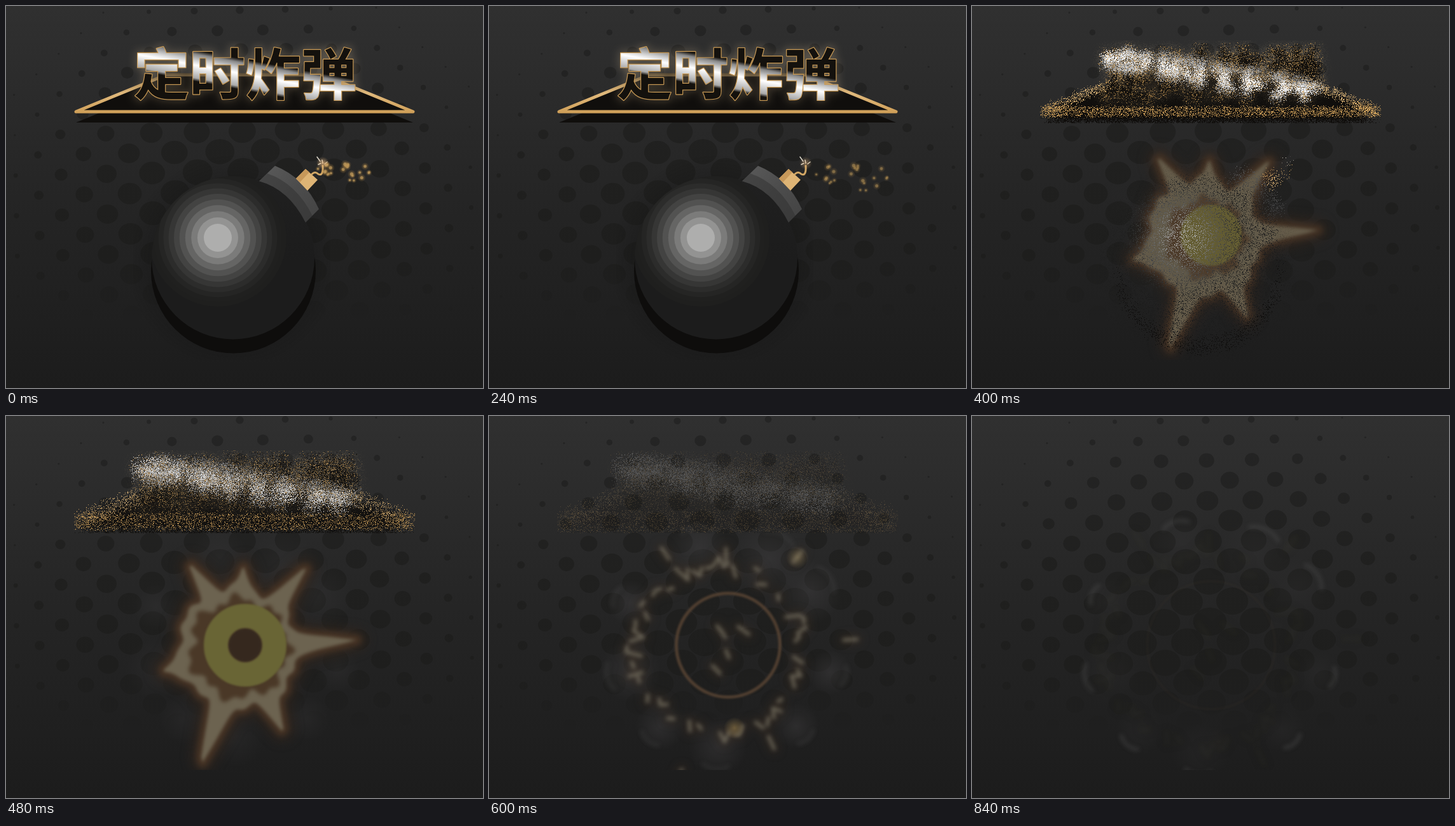
Recreate the animation shown at these times as an HTML page with a canvas. Size 750 by 600 pixels, loop 960 ms.

```html
<!DOCTYPE html>
<html lang="zh-CN">
<meta charset="utf-8">
<title>定时炸弹</title>
<style>
html, body { margin: 0; height: 100%; overflow: hidden; background: #222 }
canvas { display: block }
</style>
<canvas id="stage" width="750" height="600"></canvas>
<script>
const TAU = Math.PI * 2, LOOP = 960, STEP = 40, LAST_STEP = 21;
const { cos, sin, abs, hypot, min, max, round } = Math;
const stage = document.getElementById('stage').getContext('2d');

// Piecewise linear keys: time, value, time, value...
function key(t, ...k) {
  if (t <= k[0]) return k[1];
  for (let i = 2; i < k.length; i += 2)
    if (t <= k[i]) return k[i - 1] + (k[i + 1] - k[i - 1]) * (t - k[i - 2]) / (k[i] - k[i - 2]);
  return k[k.length - 1];
}

function random(seed) {
  return () => {
    seed = seed + 0x6D2B79F5 | 0;
    let n = Math.imul(seed ^ seed >>> 15, 1 | seed);
    n = n + Math.imul(n ^ n >>> 7, 61 | n) ^ n;
    return ((n ^ n >>> 14) >>> 0) / 4294967296;
  };
}

function gradient(c, x0, y0, x1, y1, ...stops) {
  const g = c.createLinearGradient(x0, y0, x1, y1);
  for (let i = 0; i < stops.length; i += 2) g.addColorStop(stops[i], stops[i + 1]);
  return g;
}

function glow(c, x, y, r, color, alpha) {
  const g = c.createRadialGradient(x, y, 0, x, y, r);
  g.addColorStop(0, `rgba(${color},${alpha})`);
  g.addColorStop(.4, `rgba(${color},${alpha * .6})`);
  g.addColorStop(1, `rgba(${color},0)`);
  c.fillStyle = g;
  c.fillRect(x - r, y - r, r * 2, r * 2);
}

function disc(c, x, y, r, fill) {
  c.fillStyle = fill;
  c.beginPath();
  c.arc(x, y, r, 0, TAU);
  c.fill();
}

function layer(x, y, w, h, draw) {
  const canvas = document.createElement('canvas');
  canvas.width = w;
  canvas.height = h;
  const c = canvas.getContext('2d', { willReadFrequently: true });
  c.translate(-x, -y);
  draw(c);
  const pixels = new Uint32Array(c.getImageData(0, 0, w, h).data.buffer);
  return { x, y, w, h, canvas, c, pixels, out: c.createImageData(w, h) };
}

// Shifts every pixel by up to `amount`; only the share `keep` stays visible.
function stamp({ x, y, w, h, canvas, c, pixels, out }, amount, keep, alpha) {
  if (keep <= 0 || alpha <= 0) return;
  const rnd = random(7), target = new Uint32Array(out.data.buffer);
  const shift = (v, end) => min(end, max(0, round(v + (rnd() * 2 - 1) * amount)));
  for (let j = 0, i = 0; j < h; j++)
    for (let k = 0; k < w; k++, i++) {
      const p = shift(j, h - 1) * w + shift(k, w - 1);
      target[i] = rnd() < keep ? pixels[p] : 0;
    }
  c.putImageData(out, 0, 0);
  stage.globalAlpha = alpha;
  stage.drawImage(canvas, x, y);
  stage.globalAlpha = 1;
}

const backdrop = layer(0, 0, 750, 600, c => {
  c.fillStyle = gradient(c, 0, 0, 0, 600, 0, '#303030', .5, '#252525', .72, '#212121', 1, '#1c1c1c');
  c.fillRect(0, 0, 750, 600);
  c.fillStyle = gradient(c, 0, 0, 0, 490, 0, '#252525', .5, '#20201f', .8, '#1e1e1d', 1, '#1f1f1f');
  for (let row = -11; row < 6; row++)
    for (let col = -12; col < 13; col++) {
      const x = 374 + col * 71.5 + row * 36.4, y = 323 - col * 1.3 + row * 31;
      const d = hypot((x - 370) * .98, y - 334);
      if (d > 408 || y > 490) continue;
      const r = max(1.6, 26.5 * (1 - (d / 387) ** 1.6));
      c.beginPath();
      c.ellipse(x, y, r, r * (1 - r * .006), 0, 0, TAU);
      c.fill();
    }
});

const title = layer(107, 54, 536, 130, c => {
  const plate = new Path2D('M110 166L252 108H498L640 166Z');
  c.fillStyle = '#100e0c';
  c.translate(0, 17);
  c.fill(plate);
  c.translate(0, -17);
  c.fill(plate);
  c.lineWidth = 5;
  c.lineJoin = 'round';
  c.strokeStyle = gradient(c, 0, 106, 0, 168, 0, '#4a3d29', .25, '#b8935c', .5, '#e0b97c', 1, '#cf9f58');
  c.stroke(plate);

  const text = '定时炸弹', x = 376, y = 139.5;
  c.font = '900 87.5px "Noto Sans CJK SC", "Noto Sans CJK", sans-serif';
  c.textAlign = 'center';
  c.lineWidth = 2.4;
  c.strokeStyle = '#c99a55';
  c.shadowColor = 'rgba(222,196,155,.75)';
  c.shadowBlur = 14;
  c.strokeText(text, x, y);
  c.shadowBlur = 0;
  c.fillStyle = gradient(c, 384, 58, 366, 156, 0, '#14110d', .27, '#14110d', .33, '#888',
    .42, '#ccc', .5, '#fff', .62, '#ccc', .7, '#aaa', .75, '#14110d');
  c.fillText(text, x, y);
});

const bomb = layer(200, 230, 310, 326, c => {
  glow(c, 357, 400, 165, '16,16,16', .9);
  disc(c, 357.5, 416, 129.5, '#0e0d0c');
  c.save();
  c.beginPath();
  c.arc(357, 395.5, 128, 0, TAU);
  c.clip();
  c.fillStyle = gradient(c, 0, 268, 0, 400, 0, '#202020', 1, '#1c1c1c');
  c.fillRect(200, 230, 310, 326);
  for (let i = 0; i <= 10; i++) {
    const grey = 31 + 1.43 * i * i;
    disc(c, 333, 364, 108 - 7 * i - .16 * i * i, `rgb(${grey},${grey},${grey - 1})`);
  }
  c.restore();

  c.fillStyle = gradient(c, 412, 262, 482, 330, 0, '#575757', .5, '#4c4c4c', 1, '#454545');
  c.fill(new Path2D('M423 251Q470 270 492 319L471 340Q445 288 398 275Z'));
  c.fillStyle = 'rgba(45,45,45,.45)';
  c.fill(new Path2D('M411 263Q457 279 482 330L471 340Q445 288 398 275Z'));
  c.fillStyle = '#deb475';
  c.fill(new Path2D('M471 256L490 273L474 290L456 271Z'));
  c.fillStyle = '#c7985a';
  c.fill(new Path2D('M471 256L477 261L462 277L456 271Z'));
  c.lineCap = 'round';
  c.lineWidth = 3;
  c.strokeStyle = '#d2a765';
  c.stroke(new Path2D('M481 264Q486 259 491 264Q499 268 498 251'));
  c.lineWidth = 1.5;
  c.strokeStyle = '#ddd8cc';
  c.stroke(new Path2D('M489 237L494 244M497 242L498 247M505 245L501 248M491 249L495 247'));
});

// Sparks drift away from the fuse and fan out as they go.
function drawSparks(t) {
  const alpha = key(t, 200, 1, 310, 0), rnd = random(5);
  if (!alpha) return;
  for (let i = 0; i < 24; i++) {
    const u = rnd() ** 1.3, way = u * 82 + t * (.1 + .13 * u);
    const x = 490 + way, y = 252 + way * .25 + (rnd() - .5) * (12 + way * .4);
    const size = .5 + rnd() * .5;
    glow(stage, x, y, 7 * size, '190,145,75', .6 * alpha);
    disc(stage, x, y, 2.8 * size, `rgba(190,155,95,${.65 * alpha})`);
  }
  glow(stage, 498, 247, 10, '240,190,130', .7 * alpha);
}

// Angle and length of the long rays of the blast.
const rays = [[-.05, 179], [-.9, 163], [-1.58, 127], [-2.16, 159], [2.84, 135], [1.92, 202], [1.14, 152]];

const polar = (a, r) => [374 + cos(a) * r, 361 + sin(a) * r];

function blastPath(scale, reach, jag) {
  const path = new Path2D();
  for (let i = 0; i < 240; i++) {
    const a = i / 240 * TAU;
    const base = 94 - 9 * cos(a) + 5 * sin(a) + jag * (sin(7 * a + 1) + .7 * sin(17 * a));
    let r = base;
    for (const [angle, length] of rays) {
      const off = abs(Math.atan2(sin(a - angle), cos(a - angle))) / .3;
      if (off < 1) r = max(r, base + reach * (length - base) * (1 - off) ** 3);
    }
    path.lineTo(...polar(a, r * scale));
  }
  path.closePath();
  return path;
}

function blurred(blur, alpha, paint) {
  stage.save();
  stage.globalAlpha = alpha;
  stage.filter = `blur(${blur}px)`;
  paint();
  stage.restore();
}

function fillBlurred(path, color, blur, alpha) {
  blurred(blur, alpha, () => {
    stage.fillStyle = color;
    stage.fill(path);
  });
}

function strokeBlurred(path, color, width, blur, alpha) {
  blurred(blur, alpha, () => {
    stage.strokeStyle = color;
    stage.lineWidth = width;
    stage.lineJoin = stage.lineCap = 'round';
    stage.stroke(path);
  });
}

function circle(r) {
  const path = new Path2D();
  path.arc(376, 360, r, 0, TAU);
  return path;
}

function drawBlast(t) {
  const alpha = key(t, 320, 0, 400, .85, 480, 1, 600, 0);
  const outer = key(t, 340, 20, 400, 48, 480, 65, 600, 84, 840, 102);
  const inner = key(t, 400, 0, 480, 27, 600, 79, 840, 99);
  if (alpha) {
    const size = key(t, 320, .8, 400, .96, 480, 1, 600, 1.15);
    const body = blastPath(size, 1, 4);
    strokeBlurred(body, '#33271f', 34, 8, alpha * .7);
    strokeBlurred(body, '#4a3626', 16, 4, alpha * .9);
    fillBlurred(body, '#6c6350', 2.5, alpha);
    fillBlurred(blastPath(size * key(t, 360, .5, 400, .68, 480, .82, 560, .96), 0, 8), '#4a3827', 3, alpha);
    if (inner) fillBlurred(circle(inner), '#33271f', 2, alpha * .9);
  }
  const mix = (from, to) => key(t, 480, from, 600, to);
  strokeBlurred(circle((outer + inner) / 2), `rgb(${mix(105, 88)},${mix(101, 68)},${mix(53, 51)})`,
    outer - inner, 1.5, key(t, 320, 0, 400, .8, 480, 1, 600, .85, 840, .1));
}

// A broken zigzag rim, the tips of the rays and a few splinters in the middle.
const shards = new Path2D();
{
  const rnd = random(11);
  for (let a = 0; a < TAU; a += .055) {
    const point = polar(a, 131 - 14 * cos(a) + 6 * sin(a) + (rnd() - .5) * 28);
    if (rnd() < .5) shards.lineTo(...point);
    else shards.moveTo(...point);
  }
  for (const [angle, length] of rays) {
    shards.moveTo(...polar(angle, length + 5));
    shards.lineTo(...polar(angle, length + 26));
  }
  for (let i = 0; i < 5; i++) {
    const x = 345 + rnd() * 50, y = 325 + rnd() * 75;
    shards.moveTo(x, y);
    shards.lineTo(x + rnd() * 20, y + 12);
  }
}

function drawShards(t) {
  const alpha = key(t, 480, 0, 560, .75, 600, .85, 720, .3, 840, .04);
  if (!alpha) return;
  const size = key(t, 480, .88, 600, 1, 840, 1.15);
  stage.save();
  stage.translate(375, 360);
  stage.scale(size, size);
  stage.translate(-375, -360);
  strokeBlurred(shards, '#453426', 15, 7, alpha * .5);
  strokeBlurred(shards, '#85806f', 5, 3, alpha * .75);
  glow(stage, 386, 490, 17, '150,125,75', alpha * .7);
  glow(stage, 485, 222, 18, '140,125,90', alpha * .6);
  stage.restore();
}

// Smoke puffs, each lit on the side that faces outwards.
function drawSmoke(t) {
  const alpha = key(t, 380, 0, 480, .5, 600, 1, 840, .35), rnd = random(3);
  if (!alpha) return;
  const spread = key(t, 400, .8, 600, .95, 840, 1);
  for (let i = 0; i < 9; i++) {
    const a = (i + rnd() * .5) / 9 * TAU, r = 26 + rnd() * 20;
    const [x, y] = polar(a, (203 - r) * spread);
    glow(stage, x, y, r * 1.3, '72,70,72', alpha * .35);
    const edge = new Path2D();
    edge.arc(x, y, r, a - .6, a + .6);
    strokeBlurred(edge, '#666', 6, 3, key(t, 480, 0, 600, .15, 840, .25));
  }
}

function draw(t) {
  stage.drawImage(backdrop.canvas, 0, 0);
  stage.save();
  stage.beginPath();
  stage.rect(107, 54, 536, 502);
  stage.clip();
  drawSmoke(t);
  drawBlast(t);
  drawShards(t);
  stamp(bomb, key(t, 240, 0, 320, 3, 400, 7), key(t, 240, 1, 320, .65, 400, .2, 440, 0), 1);
  drawSparks(t);
  stamp(title, key(t, 240, 0, 320, 2.5, 400, 8, 480, 13, 600, 17), 1, key(t, 450, 1, 640, 0));
  stage.restore();
}

let shown = -1;
function tick() {
  const step = min(LAST_STEP, Math.floor(performance.now() % LOOP / STEP));
  if (step !== shown) draw((shown = step) * STEP);
  requestAnimationFrame(tick);
}
tick();
</script>
</html>
```
